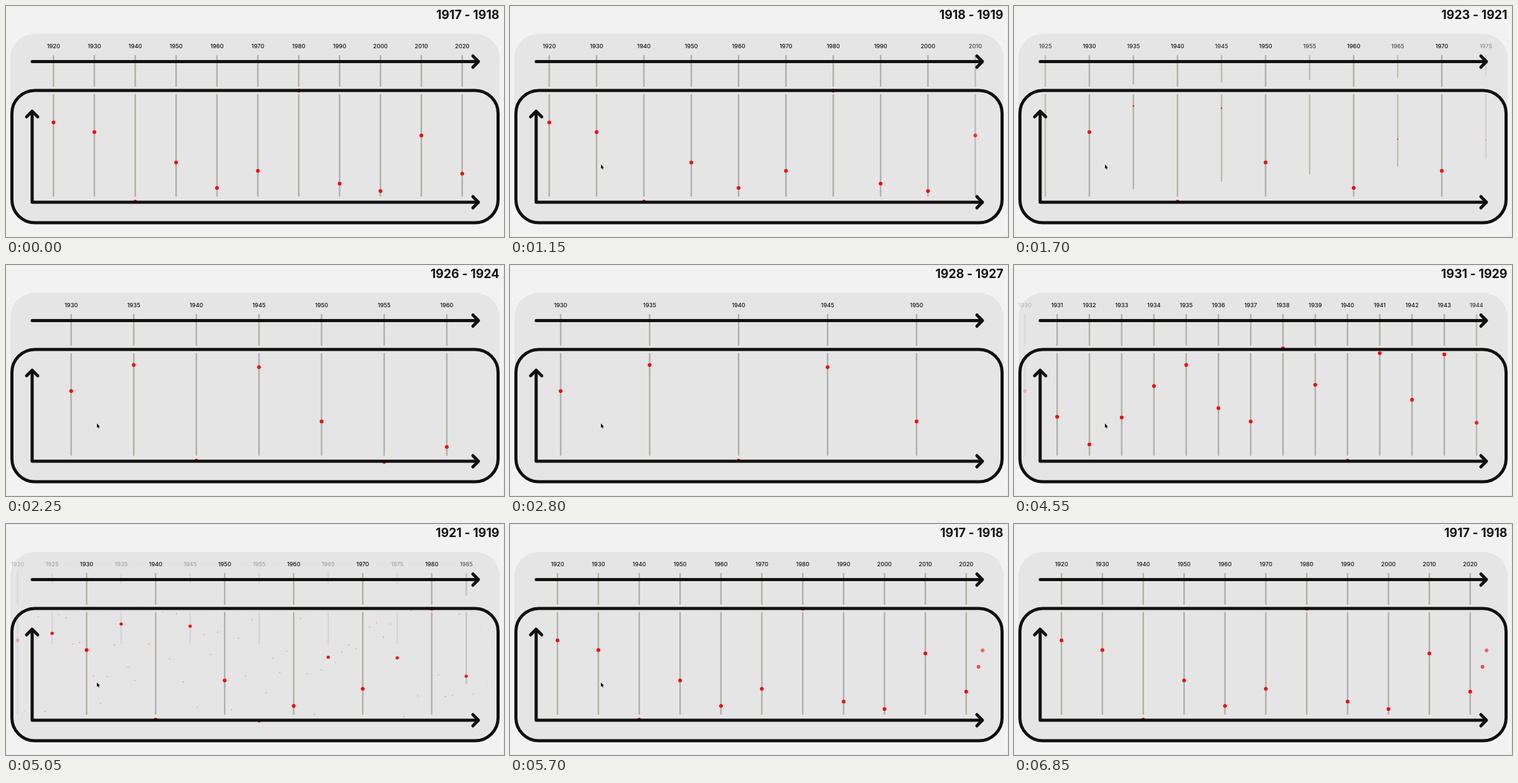
Animation, 800 px wide and 372 px high, one loop 6.9 s. Source, as an HTML page with a canvas:

```html
<!DOCTYPE html>
<html lang="en">
<head>
<meta charset="utf-8">
<title>Zooming timeline</title>
<style>
html, body { margin: 0; height: 100%; overflow: hidden; background: #f2f2f2; }
canvas { display: block; width: 100vw; height: 100vh; }
</style>
</head>
<body>
<canvas id="stage" width="800" height="372"></canvas>
<script>
const g = document.getElementById('stage').getContext('2d');
const LOOP = 6900, STEP = 50;
const FIRST = 1920, LAST = 2024;
const INK = '#111';

// dot heights by year, from 1920 to 1987
const heights = [
  187.5, 301, 230, 149, 302, 176, 146, 151, 193.5, 191,
  203, 244.5, 289, 245.5, 195, 161, 230.5, 252, 134, 193,
  315, 142, 217, 144, 254, 164.5, 295, 178, 210, 174,
  252, 299, 184, 245, 154, 317, 272, 216, 239, 205,
  293, 152, 241, 307, 235, 214.5, 223, 206, 195, 201,
  265.5, 166, 159, 182, 161, 215.5, 310, 139, 277, 316,
  136.5, 243, 278, 276, 145, 245, 274, 171
];
const lateHeights = { 1990: 286, 2000: 298, 2010: 208.5, 2020: 270, 2023: 230, 2024: 203.5 };

// time, log of zoom, first title year, second title year
const view = [
  [1020, 0, 1917, 1918],
  [1700, .768, 1923, 1921],
  [2800, 1.471, 1928, 1927],
  [3650, 1.893, 1930, 1928.4],
  [4480, 2.079, 1931, 1929],
  [4550, 2.066, 1931, 1929],
  [5050, .524, 1921, 1919],
  [5200, 0, 1917, 1918]
];
// time, x, y of the pointer
const pointer = [
  [50, 722, 366], [150, 560, 285], [250, 290, 222], [300, 160, 207], [350, 141, 226], [400, 146, 255],
  [6400, 146, 255], [6500, 143, 259], [6650, 100, 245], [6800, 3, 180]
];

const clamp = v => Math.max(0, Math.min(1, v));
const decay = (t, start, tau) => Math.exp(-Math.max(0, t - start) / tau);

function sample(keys, t) {
  if (t <= keys[0][0]) return keys[0].slice(1);
  const i = keys.findIndex(k => k[0] >= t);
  if (i < 0) return keys[keys.length - 1].slice(1);
  const a = keys[i - 1], b = keys[i];
  const p = (t - a[0]) / (b[0] - a[0]);
  return a.slice(1).map((v, j) => v + (b[j + 1] - v) * p);
}

function heightOf(year) {
  return heights[year - FIRST] ?? lateHeights[year] ?? 142 + year * 97 % 165;
}

// how far a tick and its label are shown
function tickAmount(year, t) {
  if (year % 10 === 0) return 1;
  const delay = (year - 1925) * 2.6;
  if (year % 5 === 0) {
    return clamp((t - 1350 - delay) / 350) * decay(t, year < 1985 ? 4900 : 5005, 125);
  }
  return clamp((t - 2950 - delay) / 350) * decay(t, 4700, 80);
}

function dotAmount(year, t) {
  if (year % 10 === 0) return 1;
  if (year > 2022 && t > 5100) return clamp((t - 5150) / 100);
  if (year % 5 === 0) {
    return clamp((t - 1520 - (year - 1925) * 1.5) / 400) * decay(t, 5025, 180);
  }
  const nth = Math.max(1930, Math.min(1958, year)) - 1946;
  return clamp((t - 3655 - nth * 50) / 300) * decay(t, 4700, 215);
}

function path(width, color, ...points) {
  g.lineWidth = width;
  g.strokeStyle = color;
  g.beginPath();
  points.forEach(p => g.lineTo(...p));
  g.stroke();
}

function drawYear(year, x, t) {
  const edge = clamp(Math.min((x - 5) / 60, (795 - x) / 62));
  if (!edge) return;
  const tick = tickAmount(year, t), dot = dotAmount(year, t);
  if (tick > .01) {
    g.globalAlpha = edge * tick;
    path(2.5, '#b1b1a8', [x, 80], [x, 80 + 49 * tick]);
    path(2.5, '#b1b1a8', [x, 143], [x, 143 + 163 * tick]);
    g.fillStyle = INK;
    g.font = '500 9.2px Inter, sans-serif';
    g.textAlign = 'center';
    g.fillText(year, x, 67.8);
  }
  if (dot > .02) {
    g.globalAlpha = edge;
    g.fillStyle = '#f00';
    g.beginPath();
    g.arc(x, heightOf(year), 3 * dot, 0, 7);
    g.fill();
  }
  g.globalAlpha = 1;
}

function drawAxes() {
  path(5, INK, [42, 89.5], [758, 89.5]);
  path(5, INK, [750, 80.5], [759, 89.5], [750, 98.5]);
  path(5, INK, [42, 170], [42, 316], [758, 316]);
  path(5, INK, [33, 178.5], [42, 169.5], [51, 178.5]);
  path(5, INK, [750, 307], [759, 316], [750, 325]);
  g.beginPath();
  g.roundRect(9.5, 136, 781, 213, 37);
  g.stroke();
}

function drawPointer(x, y) {
  const shape = [[0, 0], [0, 7.2], [1.7, 5.8], [2.9, 8.6], [4.1, 8.1], [2.9, 5.3], [5, 5.2]];
  g.save();
  g.translate(x, y);
  g.beginPath();
  shape.forEach(p => g.lineTo(...p));
  g.closePath();
  g.lineWidth = 1.2;
  g.strokeStyle = '#fff';
  g.stroke();
  g.fillStyle = '#000';
  g.fill();
  g.restore();
}

function draw(t) {
  const [zoom, from, to] = sample(view, t);
  const scale = 6.566 * Math.exp(zoom);

  g.fillStyle = '#f2f2f2';
  g.fillRect(0, 0, 800, 372);
  if (t >= 1050) {
    g.lineWidth = 1;
    g.strokeStyle = '#e9e9e9';
    g.strokeRect(.5, .5, 799, 371);
  }
  g.fillStyle = '#e5e5e5';
  g.beginPath();
  g.roundRect(7, 45, 786, 306, 39);
  g.fill();

  g.lineCap = g.lineJoin = 'round';
  for (let year = FIRST; year <= LAST; year++) {
    drawYear(year, 160 + scale * (year - 1932.75), t);
  }
  drawAxes();

  g.fillStyle = INK;
  g.font = '700 19.5px Inter, sans-serif';
  g.textAlign = 'right';
  g.fillText(`${Math.round(from)} - ${Math.round(to)}`, 792.5, 21);

  if (t >= 50 && t < 6850) drawPointer(...sample(pointer, t));
}

function frame(now) {
  draw(Math.floor(now % LOOP / STEP) * STEP);
  requestAnimationFrame(frame);
}
requestAnimationFrame(frame);
</script>
</body>
</html>
```
